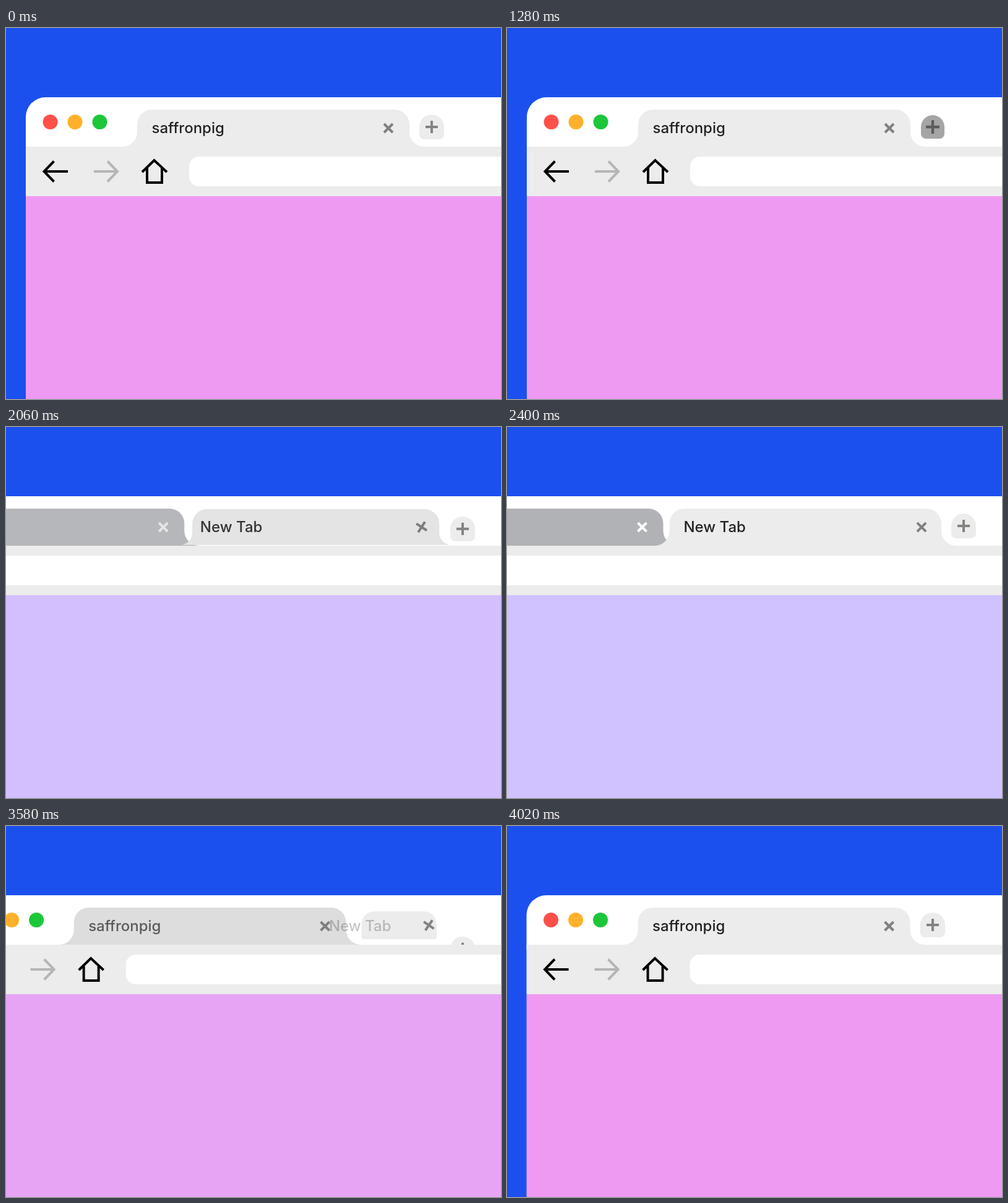
These frames come from a looping animation (800 px wide and 600 px high, 4.26 s). An HTML page:

```html
<!DOCTYPE html>
<html lang="en">
<head>
<meta charset="utf-8">
<title>New tab</title>
<style>
  html, body { margin: 0; width: 100%; height: 100%; overflow: hidden; background: #1b50ef; }
  svg { display: block; width: 800px; height: 600px; }
  text { font: 500 24px Inter, Roboto, sans-serif; }
  .line { fill: none; stroke: #000; stroke-width: 4; }
</style>
</head>
<body>
<svg viewBox="0 0 800 600">
  <rect width="800" height="600" fill="#1b50ef"/>
  <g class="slide">
    <path d="M32 200V144A32 32 0 0 1 64 112H1300V200Z" fill="#fff"/>
    <circle cx="71.5" cy="152" r="12" fill="#ff5149"/>
    <circle cx="111.5" cy="152" r="12" fill="#ffb12b"/>
    <circle cx="151.5" cy="152" r="12" fill="#1dc73a"/>
  </g>

  <g id="nextAdd">
    <path id="nextBox" fill="#ececec"/>
    <path class="line" d="M728 160H748M738 150V170" style="stroke:#83837f"/>
  </g>

  <g class="slide">
    <rect x="32" y="192" width="1268" height="80" fill="#ececec"/>
    <rect id="page" x="32" y="272" width="1268" height="328"/>
    <rect x="296" y="208" width="980" height="48" rx="16" fill="#fff"/>
    <path class="line" d="M100 232H62M77.500 215.500L61.500 232L77.500 248.500"/>
    <path class="line" d="M142 232H180M164 215.500L180 232L164 248.500" style="stroke:#b5b5b5"/>
    <path class="line" d="M220 233L239.500 214L260 233M228 225V250H252V225"/>
    <path id="tab"/>
    <text id="title" x="235.500" y="170">saffronpig</text>
    <path id="close" class="line" d="M611 155L625 169M625 155L611 169"/>
  </g>

  <path id="newTab"/>
  <text id="newTitle" y="170" fill="#222">New Tab</text>
  <path id="glyph" class="line" d="M-10 0H10M0 -10V10"/>
</svg>

<script>
const LOOP = 4260;
const HOVER = 520, PRESS = 1140, OPEN = 1788, BACK = 3400;
const SHIFT = -400;

const $ = id => document.getElementById(id);
const slides = document.querySelectorAll('.slide');
const lerp = (a, b, p) => a + (b - a) * p;
const mix = (a, b, p) => a.map((v, i) => lerp(v, b[i], p));
const rgb = c => `rgb(${c.map(Math.round)})`;
const gray = v => [v, v, v];

// Critically damped spring from 0 to 1
function spring(ms, rate) {
  const x = Math.max(0, ms) * rate / 1000;
  return 1 - (1 + x) * Math.exp(-x);
}

// Positive foot flares outward, negative foot rounds the bottom corners
function tabPath(l, r, t, b, top, foot) {
  const f = Math.abs(foot), sweep = foot < 0 ? 1 : 0;
  return `M${l - foot} ${b}A${f} ${f} 0 0 ${sweep} ${l} ${b - f}` +
    `V${t + top}A${top} ${top} 0 0 1 ${l + top} ${t}` +
    `H${r - top}A${top} ${top} 0 0 1 ${r} ${t + top}` +
    `V${b - f}A${f} ${f} 0 0 ${sweep} ${r + foot} ${b}Z`;
}

function draw(t) {
  const p = t < BACK ? spring(t - OPEN, 14.7) : 1 - spring(t - BACK, 14.7);
  const hover = t < BACK ? spring(t - HOVER, 20) : 0;
  const press = t < BACK ? spring(t - PRESS, 20) : 0;

  slides.forEach(g => g.setAttribute('transform', `translate(${SHIFT * p} 0)`));
  $('page').setAttribute('fill', rgb(mix([239, 154, 242], [208, 194, 255], p)));
  $('tab').setAttribute('fill', rgb(mix(gray(236), [177, 178, 181], p)));
  $('title').setAttribute('fill', rgb(gray(lerp(34, 255, p))));
  $('close').style.stroke = rgb(gray(lerp(0, 255, p)));
  $('close').style.opacity = lerp(0.46, 1, p);

  $('nextAdd').setAttribute('transform', `translate(0 ${lerp(52, 0, p)})`);

  // The add button grows into the new tab
  const scale = 1 - 0.065 * press;
  const half = 20 * scale;
  const inset = 24 * (1 - (1 - p) ** 4);
  $('newTab').setAttribute('d', tabPath(
    lerp(688 - half, 238, p) + inset,
    lerp(688 + half, 726, p) - inset,
    lerp(160 - half, 132, p),
    lerp(160 + half, 192, p),
    lerp(half, 24, p),
    lerp(-8, 24, p ** 1.5)));
  $('newTab').setAttribute('fill', rgb(gray(lerp(lerp(236, 144, press), 236, p))));

  $('newTitle').setAttribute('x', lerp(603.5, 285, p));
  $('newTitle').setAttribute('opacity', p);

  const size = lerp((1 + 0.15 * hover) * scale, 1, p);
  $('glyph').setAttribute('transform',
    `translate(${lerp(688, 670, p)} ${lerp(160, 162, p)}) rotate(${135 * p}) scale(${size})`);
  $('glyph').style.stroke = rgb(gray(lerp(lerp(131, 81, press), 129, p)));
}

$('tab').setAttribute('d', tabPath(212, 652, 132, 192, 24, 24));
$('nextBox').setAttribute('d', tabPath(718, 758, 140, 180, 20, -8));

const start = performance.now();
function tick() {
  draw((performance.now() - start) % LOOP);
  requestAnimationFrame(tick);
}
tick();
</script>
</body>
</html>
```
